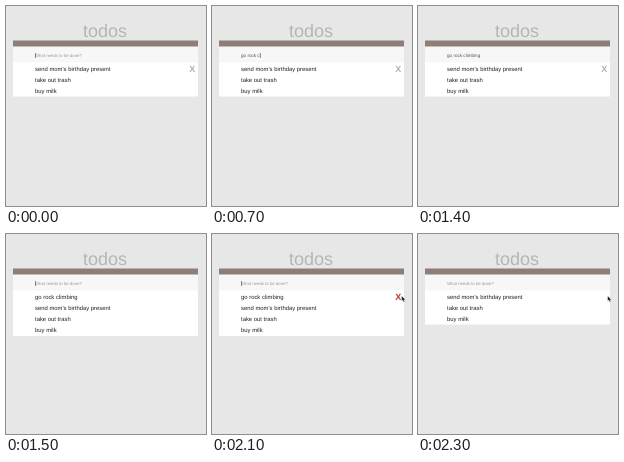
These frames come from a looping animation (200x200 px, 2400 ms). An HTML page:

```html
<!DOCTYPE html>
<html lang="en">
<head>
<meta charset="utf-8">
<title>Todo list</title>
<style>
  html, body { margin: 0; width: 100%; height: 100%; overflow: hidden; background: #e7e7e7; }
  svg { display: block; width: 100vw; height: 100vh; }
  text { font-family: "Liberation Sans", Arial, sans-serif; text-rendering: geometricPrecision; white-space: pre; }
</style>
</head>
<body>
<svg viewBox="0 0 200 200">
  <rect width="200" height="200" fill="#e7e7e7"/>
  <text x="99" y="31" font-size="18" text-anchor="middle" fill="#b5b5b5">todos</text>
  <rect id="list" x="7" y="40" width="185" height="50.5" fill="#fff"/>
  <rect x="7" y="40" width="185" height="16.5" fill="#f7f7f7"/>
  <rect x="7" y="34.5" width="185" height="6" fill="#8d7f78"/>
  <text id="field" x="29" y="51"></text>
  <rect id="caret" y="47" width=".6" height="5" fill="#444"/>
  <g id="rows" font-size="5.9" fill="#222"></g>
  <text id="remove" x="186.2" y="66" font-size="9" font-weight="bold" text-anchor="middle">x</text>
  <circle id="click" cx="189.5" cy="62" r="7.8" fill="#fff" fill-opacity=".45" stroke="#333" stroke-width="1.1"/>
  <path id="pointer" d="M0 0V5L1.1 4L2 6L2.9 5.6L2 3.7H3.6Z" fill="#111" stroke="#fff" stroke-width=".25"/>
</svg>
<script>
const LOOP = 2400, STEP = 100;
const $ = id => document.getElementById(id);
const show = (el, on) => el.setAttribute("visibility", on ? "visible" : "hidden");
const between = (t, a, b) => t >= a && t < b;

const task = "go rock climbing";
const rows = [task, "send mom's birthday present", "take out trash", "buy milk"].map(label => {
  const row = document.createElementNS("http://www.w3.org/2000/svg", "text");
  row.setAttribute("x", 29);
  row.textContent = label;
  $("rows").append(row);
  return row;
});

// [time, number of typed characters]
const typing = [[0, 0], [100, 1], [200, 2], [300, 4], [400, 5], [500, 6], [600, 7],
  [700, 9], [800, 11], [1000, 12], [1100, 14], [1200, 16], [1500, 0]];

function drawField(t) {
  const typed = task.slice(0, typing.findLast(k => k[0] <= t)[1]);
  const field = $("field");
  field.textContent = typed || "What needs to be done?";
  field.setAttribute("font-size", typed ? 4.6 : 4.3);
  field.setAttribute("fill", typed ? "#555" : "#999");
  $("caret").setAttribute("x", 29 + (typed ? field.getComputedTextLength() + .3 : .2));
  show($("caret"), t < 1400 || between(t, 1500, 1700) || between(t, 1900, 2200));
}

function drawList(t) {
  const added = between(t, 1500, 2300);
  show(rows[0], added);
  rows.forEach((row, i) => row.setAttribute("y", 64.9 + 11.15 * (added ? i : i - 1)));
  $("list").setAttribute("height", added ? 62 : 50.5);
}

function drawMouse(t) {
  show($("remove"), t < 1500 || between(t, 1900, 2300));
  $("remove").textContent = "X";
  $("remove").setAttribute("fill", between(t, 2100, 2300) ? "#b3392d" : "#b0b0b0");
  show($("click"), between(t, 2200, 2300));
  show($("pointer"), t >= 1900);
  const x = 191.7 - 2 * Math.min(1, Math.max(0, (t - 1900) / 200));
  $("pointer").setAttribute("transform", `translate(${x} 62)`);
}

function draw(now) {
  const t = Math.floor(now % LOOP / STEP) * STEP;
  drawField(t);
  drawList(t);
  drawMouse(t);
  requestAnimationFrame(draw);
}
draw(performance.now());
</script>
</body>
</html>
```
